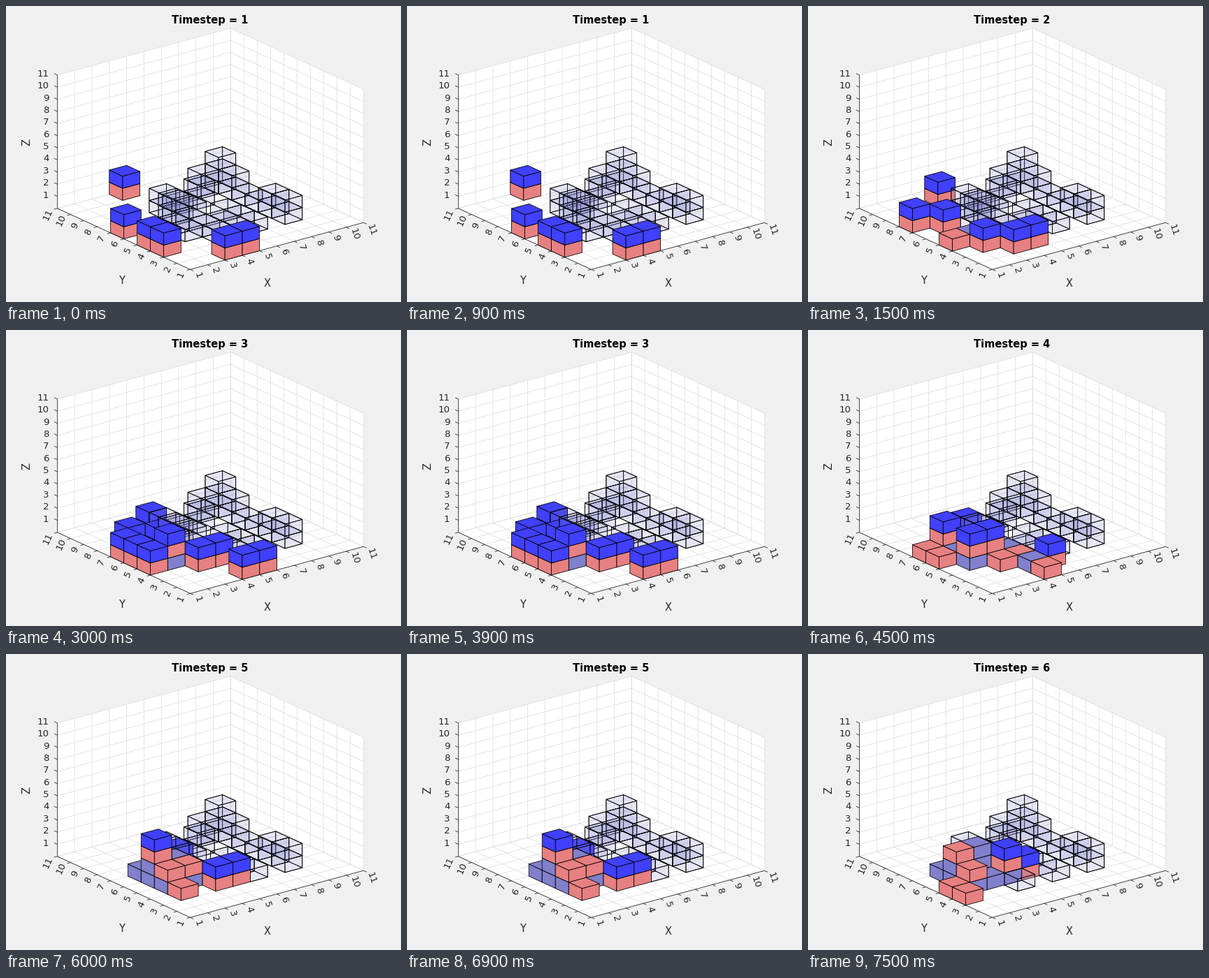
A matplotlib script that plays this animation: 565x424 px, repeating every 8000 ms.

```python
import numpy as np
import matplotlib.pyplot as plt
from matplotlib.animation import FuncAnimation
from matplotlib.collections import LineCollection, PolyCollection

W, H, DPI = 565, 424, 100
PX = 72 / DPI
INK = (0.15, 0.15, 0.15)
GRID = (0.87, 0.87, 0.87)
RED = (0.905, 0.5, 0.5, 1)
BLUE = (0.25, 0.25, 1, 1)
PLACED = (0.5, 0.5, 0.8, 1)
GHOST = (0.5, 0.5, 0.8, 0.1)

plt.rcParams["font.family"] = "DejaVu Sans"

# Orthographic view: azimuth -37.5, elevation 30, stretched to fill the axes.
AZ, EL = np.radians(37.5), np.radians(30)
SH = 0.775 * W / (np.cos(AZ) + np.sin(AZ))
SV = 0.815 * H / ((np.cos(AZ) + np.sin(AZ)) * np.sin(EL) + np.cos(EL))
EX = np.array([np.cos(AZ) * SH, -np.sin(AZ) * np.sin(EL) * SV]) / 10
EY = np.array([-np.sin(AZ) * SH, -np.cos(AZ) * np.sin(EL) * SV]) / 10
EZ = np.array([0, -np.cos(EL) * SV]) / 11
ORIGIN = np.array([0.13 * W, 0.89 * H]) - [10 * EY[0], 0]


def project(x, y, z):
    """Pixel position of a point; x and y count cells from the front corner."""
    return ORIGIN + x * EX + y * EY + z * EZ


# Planned structure: column x -> (first y, heights along y)
PLAN = {
    2: (3, [1, 3]),
    3: (2, [1, 1, 2, 2, 2]),
    4: (3, [1, 0, 0, 1]),
    5: (2, [1, 1, 1, 0, 2]),
    6: (7, [2]),
    7: (2, [2, 2, 1, 1, 2, 3]),
}
GHOSTS = {(x, y0 + i, z)
          for x, (y0, hs) in PLAN.items()
          for i, h in enumerate(hs) for z in range(h)}

# Robots on the floor or on placed blocks, with and without a carried block
LOADED = [
    [(3, 9), (0, 5), (0, 3), (0, 2), (2, 0), (3, 0)],
    [(3, 8), (0, 6), (1, 5), (1, 2), (2, 1), (3, 1)],
    [(3, 7), (1, 6), (2, 5), (0, 5), (0, 4), (0, 3),
     (1, 3), (2, 2), (3, 2), (3, 0), (4, 0)],
    [(3, 6), (1, 5), (1, 3), (2, 3), (4, 1)],
    [(3, 5), (1, 4), (3, 2), (4, 2)],
    [(3, 3), (4, 3)],
]
EMPTY = [
    [],
    [(0, 3)],
    [],
    [(2, 5), (0, 5), (0, 4), (2, 2), (3, 2), (3, 0)],
    [(1, 3), (2, 3), (1, 2)],
    [(1, 4), (1, 3), (0, 3), (0, 2)],
]
DROPS = {1: [(1, 3)],
         3: [(1, 5), (1, 4), (2, 3), (3, 3), (3, 1), (2, 4)],
         4: [(1, 4), (2, 4)],
         5: [(2, 4)]}
PICKUPS = {4: [(3, 1)]}


def heights(step):
    h = {}
    for s in range(step + 1):
        for c in DROPS.get(s, []):
            h[c] = h.get(c, 0) + 1
        for c in PICKUPS.get(s, []):
            h[c] -= 1
    return h


def cubes(step):
    h = heights(step)
    out = {c: GHOST for c in GHOSTS}
    for (x, y), n in h.items():
        for z in range(n):
            out[x, y, z] = PLACED
    for x, y in LOADED[step] + EMPTY[step]:
        out[x, y, h.get((x, y), 0)] = RED
    for x, y in LOADED[step]:
        out[x, y, h.get((x, y), 0) + 1] = BLUE
    return out


def faces(x, y, z, hollow):
    def quad(o, a, b):
        p = project(*o)
        return [p, p + a, p + a + b, p + b]

    front = [quad((x, y, z), EY, EZ), quad((x, y, z), EX, EZ),
             quad((x, y, z + 1), EX, EY)]
    back = [quad((x, y, z), EX, EY), quad((x + 1, y, z), EY, EZ),
            quad((x, y + 1, z), EX, EZ)]
    return back + front if hollow else front


def scene(step):
    """All faces ordered from far to near."""
    polys, fills = [], []
    found = cubes(step)
    for c in sorted(found, key=lambda c: (-c[0] - c[1], -c[0], c[2])):
        fs = faces(*c, found[c] is GHOST)
        polys += fs
        fills += [found[c]] * len(fs)
    return polys, fills


fig = plt.figure(figsize=(W / DPI, H / DPI), dpi=DPI, facecolor=(0.941,) * 3)
ax = fig.add_axes([0, 0, 1, 1])
ax.set_xlim(0, W)
ax.set_ylim(H, 0)
ax.axis("off")


def lines(segs, color, z):
    ax.add_collection(LineCollection(segs, colors=[color], linewidths=0.8 * PX, zorder=z))


def label(x, y, s, size=13.33, **kw):
    kw = {"ha": "center", "va": "center", "color": INK, **kw}
    return ax.text(x, y, s, fontsize=size * PX, **kw)


def draw_axes():
    rim = [(0, 0, 0), (10, 0, 0), (10, 0, 11), (10, 10, 11), (0, 10, 11), (0, 10, 0)]
    ax.fill(*np.array([project(*p) for p in rim]).T, color="white", lw=0, zorder=0)

    grid, axis = [], []
    for i in range(11):
        grid += [[project(i, 0, 0), project(i, 10, 0), project(i, 10, 11)],
                 [project(0, i, 0), project(10, i, 0), project(10, i, 11)]]
    for z in range(12):
        grid.append([project(0, 10, z), project(10, 10, z), project(10, 0, z)])
    lines(grid, GRID, 1)

    axis.append([project(10, 0, 0), project(0, 0, 0), project(0, 10, 0), project(0, 10, 11)])
    tx, ty = -EY / np.hypot(*EY) * 5, -EX / np.hypot(*EX) * 5
    for i in range(11):
        px, py, pz = project(i, 0, 0), project(0, i, 0), project(0, 10, i + 1)
        axis += [[px, px + tx], [py, py + ty], [pz, pz - tx]]
        far = 2 if i >= 9 else 0
        label(px[0] + 10.5 + far / 2, px[1] + 8.5 + far, i + 1, rotation=-72)
        label(py[0] - 13, py[1] + 7.5 + far / 2, i + 1, rotation=65)
        label(61.5, pz[1] - 3, i + 1, ha="right", va="center_baseline")
    lines(axis, INK, 2)

    label(374, 397, "X", 14.67)
    label(165, 394, "Y", 14.67)
    label(30, 195, "Z", 14.67, rotation=90)


draw_axes()
title = label(291.5, 25, "", 14.67, weight="bold", color="black", va="baseline")
blocks = PolyCollection([], edgecolors="black", linewidths=0.8 * PX, zorder=3)
blocks.set_joinstyle("round")
ax.add_collection(blocks, autolim=False)

TICK = 500
FRAMES = 16
SCENES = [scene(s) for s in range(6)]


def update(n):
    step = n * TICK // 1500
    polys, fills = SCENES[step]
    blocks.set_verts(polys)
    blocks.set_facecolor(fills)
    title.set_text(f"Timestep = {step + 1}")
    return blocks, title


anim = FuncAnimation(fig, update, frames=FRAMES, interval=TICK, repeat=True,
                     repeat_delay=0, blit=False)
plt.show()
```
